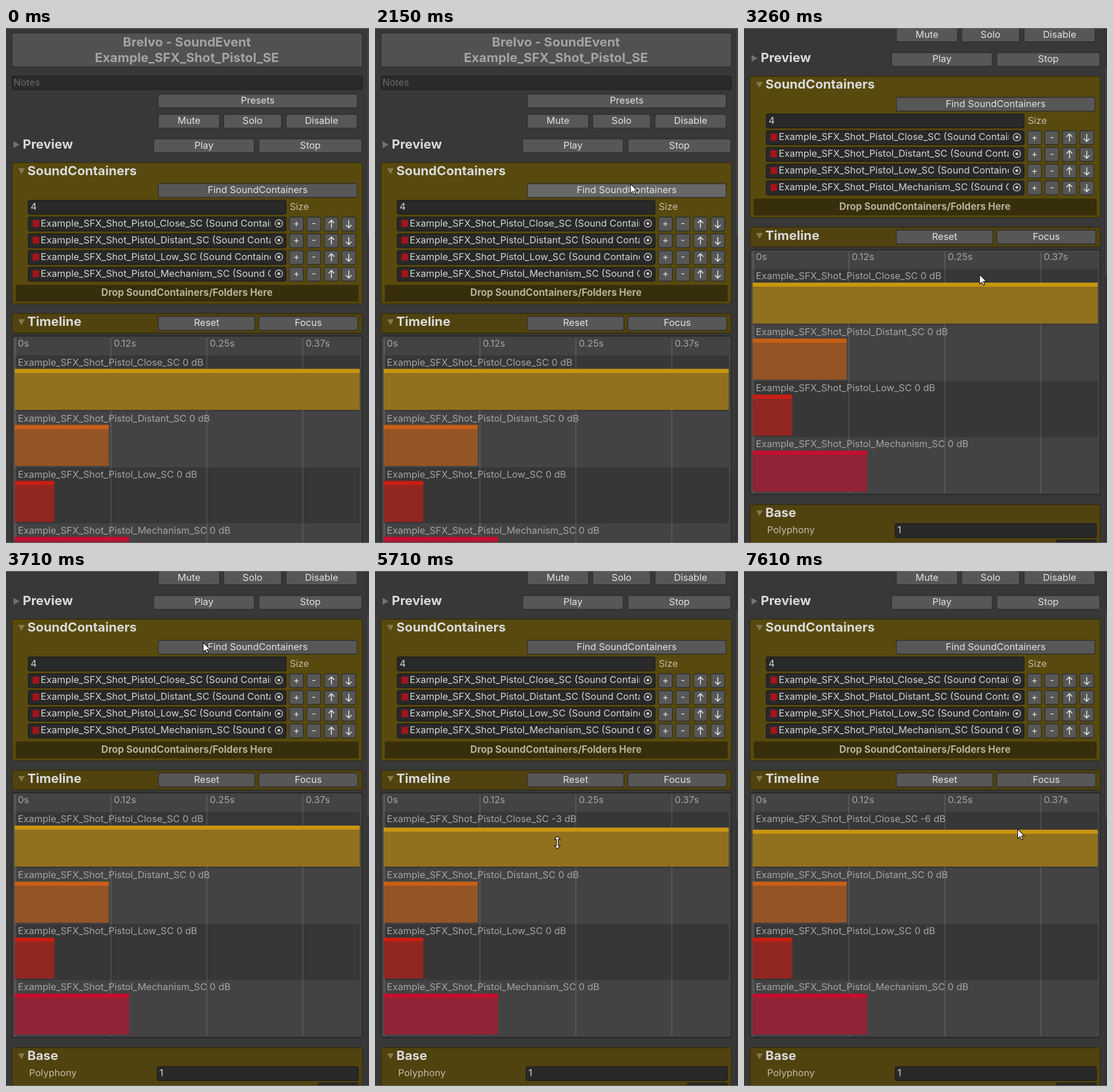
An HTML page with a canvas that plays this animation: 628 px wide and 892 px high, repeating every 8000 ms.

```html
<!DOCTYPE html>
<html lang="en">
<head>
<meta charset="utf-8">
<title>Sound event inspector</title>
<style>
  html, body { margin: 0; width: 100%; height: 100%; overflow: hidden; background: #383838; }
  canvas { display: block; }
</style>
</head>
<body>
<canvas id="stage" width="628" height="892"></canvas>
<script>
const ctx = document.getElementById('stage').getContext('2d');
const LOOP = 8000;
const SCROLL = 149.5;
const PX_PER_SECOND = 1328;
const LEFT = 10, RIGHT = 617, TRACK_LEFT = 15, TRACK_RIGHT = 612, BUTTON_H = 25;
const OLIVE = '#50430f', OLIVE_BRIGHT = '#58490e', PANEL = '#434343', PANEL_DARK = '#373737';
const LABEL = '#c2bdab', HEADING = '#dadada', VALUE = '#d4d4d4', MUTED = '#a4a4a4', BRIGHT = '#e2e2e2';

const tracks = [
  { name: 'Close', seconds: .4495, color: '#c8950f' },
  { name: 'Distant', seconds: .1225, color: '#c85f14' },
  { name: 'Low', seconds: .0516, color: '#c81e12' },
  { name: 'Mechanism', seconds: .149, color: '#c40f30' },
];
const assetName = track => `Example_SFX_Shot_Pistol_${track.name}_SC`;

// ---- Motion ----

const clamp = (v, lo, hi) => Math.min(hi, Math.max(lo, v));

// Each move is a straight line that may bow vertically; the pointer rests in between.
const moves = [
  { from: 900, to: 1310, x: 332, y: 198 },
  { from: 1490, to: 1610, x: 498, y: 184 },
  { from: 1760, to: 2150, x: 442, y: 270 },
  { from: 2210, to: 2360, x: 441, y: 275 },
  { from: 2610, to: 3410, x: 400, y: 48, bow: 610 },
  { from: 3470, to: 3710, x: 341, y: 123 },
  { from: 3710, to: 4260, x: 416, y: 603 },
  { from: 4470, to: 4960, x: 325, y: 461 },
  { from: 5290, to: 5350, x: 316, y: 462 },
  { from: 5630, to: 6420, x: 311, y: 445, bow: 32 },
  { from: 6540, to: 6720, x: 473.5, y: 447 },
];

function pointerAt(t) {
  let x = 400, y = 358;
  for (const move of moves) {
    const k = clamp((t - move.from) / (move.to - move.from), 0, 1);
    x += (move.x - x) * k;
    y += (move.y - y) * k + (move.bow || 0) * Math.sin(Math.PI * k);
  }
  return { x, y };
}

const dragging = t => t >= 5630 && t < 6540;

// The drag lowers the volume by 3 dB per 8 px; later it steps down by 2 dB.
function volumeAt(t) {
  if (dragging(t)) return -Math.max(0, Math.round((pointerAt(t).y - 462) * 3 / 8));
  return -2 * clamp(1 + Math.floor((t - 7430) / 90), 0, 3);
}

// Three notches of the wheel
const scrollAt = t => SCROLL / 3 * clamp(1 + Math.floor((t - 2210) / 75), 0, 3);

function hoverAt(t) {
  const during = (from, to) => t >= from && t < to;
  if (during(900, 1000)) return 'Distant';
  if (during(2060, 2285)) return 'Find';
  if (during(2360, 2640)) return 'Mechanism';
}

// ---- Drawing helpers ----

function rect(x, y, w, h, fill) {
  ctx.fillStyle = fill;
  ctx.fillRect(x, y, w, h);
}

function box(x, y, w, h, fill, edge) {
  ctx.beginPath();
  ctx.roundRect(x + .5, y + .5, w - 1, h - 1, 3);
  ctx.fillStyle = fill;
  ctx.fill();
  ctx.strokeStyle = edge;
  ctx.lineWidth = 1.3;
  ctx.stroke();
}

function text(str, x, y, color, { size = 16.5, weight = 400, align = 'left' } = {}) {
  ctx.font = `${weight} ${size}px Inter, sans-serif`;
  ctx.textAlign = align;
  ctx.textBaseline = 'middle';
  ctx.fillStyle = color;
  ctx.fillText(str, x, y);
}

const heading = (str, x, y, color = HEADING, align) =>
  text(str, x, y, color, { size: 22.2, weight: 700, align });

function button(label, x, y, w, hot) {
  box(x, y, w, BUTTON_H, hot ? '#676767' : '#575757', '#2e2e2e');
  text(label, x + w / 2, y + BUTTON_H / 2, BRIGHT, { align: 'center' });
}

function field(value, x, y, w, hot) {
  box(x, y, w, BUTTON_H, '#292929', hot ? '#686868' : '#1d1d1d');
  text(value, x + 4.5, y + BUTTON_H / 2, VALUE);
}

function polygon(points, fill) {
  ctx.beginPath();
  points.forEach(([x, y]) => ctx.lineTo(x, y));
  ctx.closePath();
  ctx.fillStyle = fill;
  ctx.fill();
}

function section(title, top, height, fill = OLIVE) {
  const y = top + 15.5;
  box(LEFT, top, RIGHT - LEFT, height, fill, '#332c10');
  polygon([[21, y - 5], [32.5, y - 5], [26.8, y + 5]], '#82794f');
  heading(title, 37, y);
}

function stroke(color, width) {
  ctx.strokeStyle = color;
  ctx.lineWidth = width;
  ctx.stroke();
}

function arrowButton(x, y, dir) {
  button('', x, y, BUTTON_H);
  ctx.save();
  ctx.translate(x + BUTTON_H / 2, y + BUTTON_H / 2);
  ctx.scale(1, dir);
  ctx.beginPath();
  ctx.moveTo(0, 6.5);
  ctx.lineTo(0, -6);
  ctx.moveTo(-5, -1.5);
  ctx.lineTo(0, -6.5);
  ctx.lineTo(5, -1.5);
  stroke(BRIGHT, 1.6);
  ctx.restore();
}

function picker(x, y) {
  ctx.beginPath();
  ctx.arc(x, y, 6.3, 0, 7);
  stroke('#c8c8c8', 1.4);
  ctx.beginPath();
  ctx.arc(x, y, 2.5, 0, 7);
  ctx.fillStyle = '#c8c8c8';
  ctx.fill();
}

// ---- Panels ----

function drawHeader() {
  box(LEFT, 8, RIGHT - LEFT, 60, '#515151', '#2d2d2d');
  heading('Brelvo - SoundEvent', 313, 25.5, MUTED, 'center');
  heading('Example_SFX_Shot_Pistol_SE', 313, 52, MUTED, 'center');
  box(LEFT, 83, RIGHT - LEFT, 24, '#2b2b2b', '#202020');
  text('Notes', 13, 95.5, '#6c6c6c');
  button('Presets', 263, 114, 345);
  button('Mute', 263, 149, 107);
  button('Solo', 376, 149, 101);
  button('Disable', 484, 149, 124);
  polygon([[13, 196], [13, 208], [23.5, 202]], '#727272');
  heading('Preview', 29, 202);
  button('Play', 255, 191.5, 175);
  button('Stop', 437, 191.5, 179);
}

function drawContainerRow(track, y, hot) {
  const middle = y + 11.5;
  field('', 38, y, 447, hot);
  rect(46, middle - 6, 11, 12, '#a8131a');
  ctx.save();
  ctx.beginPath();
  ctx.rect(58, y, 400, BUTTON_H);
  ctx.clip();
  text(`${assetName(track)} (Sound Container)`, 60, middle + .3, VALUE);
  ctx.restore();
  picker(472, middle);
  button('+', 490, y, BUTTON_H);
  button('-', 520, y, BUTTON_H);
  arrowButton(550.5, y, 1);
  arrowButton(580.5, y, -1);
}

function drawContainers(hover) {
  section('SoundContainers', 232.5, 246, OLIVE_BRIGHT);
  button('Find SoundContainers', 263, 269, 345, hover === 'Find');
  field('4', 38, 298, 447);
  text('Size', 491, 310.5, LABEL);
  tracks.forEach((track, i) => drawContainerRow(track, 327 + i * 29, hover === track.name));
  rect(17, 445, 593, 29, '#372e0b');
  text('Drop SoundContainers/Folders Here', 313, 459, '#b7b19b',
    { size: 16.75, weight: 700, align: 'center' });
}

function drawTrack(track, i, volume) {
  const top = 567 + i * 97, bottom = top + 94.5;
  const barTop = top + 23.5 - volume * 71 / 60;
  const width = track.seconds * PX_PER_SECOND;
  rect(TRACK_LEFT, barTop, width, bottom - barTop, i % 2 ? PANEL : PANEL_DARK);
  ctx.globalAlpha = .62;
  rect(TRACK_LEFT, barTop, width, bottom - barTop, track.color);
  ctx.globalAlpha = 1;
  rect(TRACK_LEFT, barTop, width, 7, track.color);
  text(`${assetName(track)} ${volume} dB`, 20.5, top + 13, MUTED);
}

function drawTimeline(t) {
  section('Timeline', 494, 35);
  button('Reset', 263, 499, 168);
  button('Focus', 437, 499, 172);

  const top = 537, height = 418;
  box(LEFT, 533, RIGHT - LEFT, 425, PANEL, '#222222');
  for (const i of [0, 2]) rect(TRACK_LEFT, 567 + i * 97, TRACK_RIGHT - TRACK_LEFT, 97, PANEL_DARK);
  ['0s', '0.12s', '0.25s', '0.37s'].forEach((label, i) => {
    const x = TRACK_LEFT + i * PX_PER_SECOND / 8;
    rect(x - .5, top, i ? 2 : 3, height, 'rgba(255,255,255,.12)');
    text(label, x + 5.5, 547, MUTED);
  });
  tracks.forEach((track, i) => drawTrack(track, i, i ? 0 : volumeAt(t)));

  // Playhead, moving in real time and refreshed every 60 ms
  if (t >= 4960 && t < 5320) {
    const seconds = .0745 + Math.floor((t - 4960) / 60) * .06;
    rect(TRACK_LEFT + seconds * PX_PER_SECOND, top, 3, height, 'rgba(40,40,40,.6)');
  }
}

function drawBase() {
  section('Base', 974.5, 130);
  text('Polyphony', 40, 1020, LABEL);
  field('1', 261, 1007.5, 349);
  field('', 540, 1036, 70);
}

function drawPointer(t) {
  if (t < moves[0].from) return;
  const { x, y } = pointerAt(t);
  const half = [[0, -11], [5, -5.5], [1.5, -5.5], [1.5, 5.5], [5, 5.5]];
  const resize = [...half, ...half.map(([px, py]) => [-px, -py])];
  const arrow = [[0, 0], [0, 16.5], [3.9, 12.9], [6.4, 18.6], [9, 17.5], [6.5, 11.9], [11.6, 11.6]];
  ctx.save();
  ctx.translate(x, y);
  polygon(dragging(t) ? resize : arrow, '#fff');
  stroke('#111', 1.1);
  ctx.restore();
}

function draw(t) {
  const scroll = scrollAt(t);
  rect(0, 0, 628, 892, '#383838');
  ctx.save();
  ctx.translate(0, -scroll);
  drawHeader();
  drawContainers(hoverAt(t));
  drawTimeline(t);
  drawBase();
  ctx.restore();

  rect(623, 0, 5, 892, '#353535');
  rect(625, 2 + scroll * .44, 3, 360, '#434343');
  for (const y of [0, 891]) rect(0, y, 628, 1, '#6a6a6a');
  drawPointer(t);
}

function tick() {
  draw(performance.now() % LOOP);
  requestAnimationFrame(tick);
}
tick();
</script>
</body>
</html>
```
